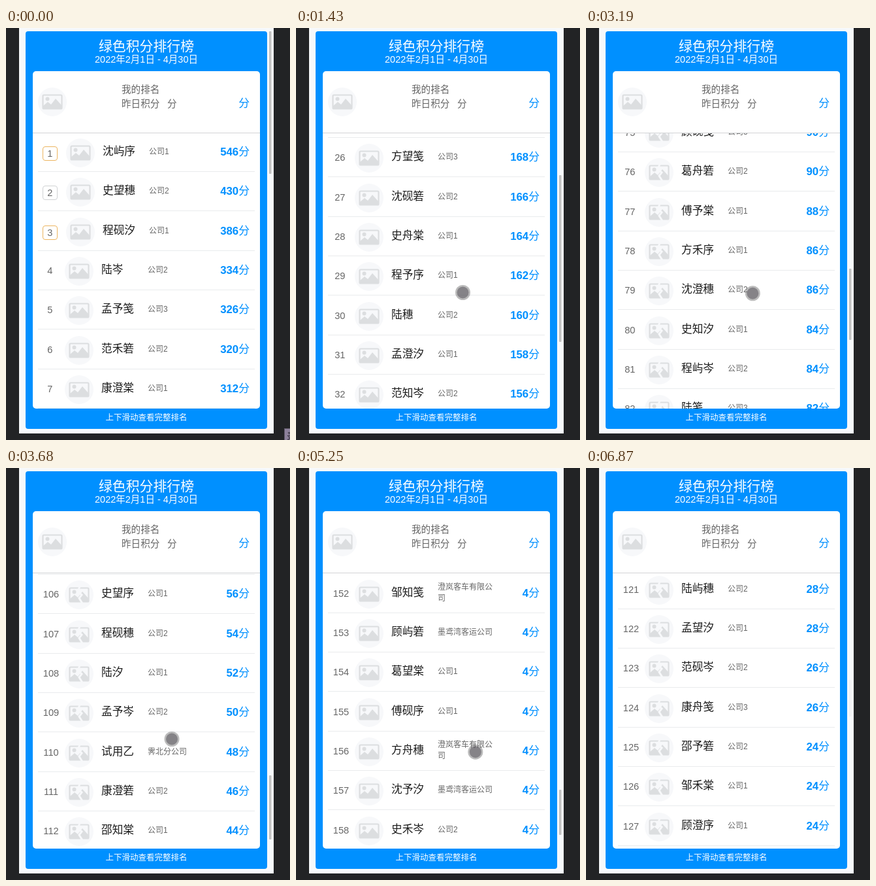
An HTML page for the animation above (7140 ms loop, 435 by 630 pixels).

```html
<!DOCTYPE html>
<html lang="zh-CN">
<head>
<meta charset="utf-8">
<style>
html, body { margin: 0; width: 100%; height: 100%; overflow: hidden; background: #222325; }
svg { display: block; font-family: "Liberation Sans", "Noto Sans CJK SC", "Noto Sans CJK", sans-serif; }
.name { font-size: 16.7px; fill: #1c1c1c; }
.rank { font-size: 14.6px; fill: #666; text-anchor: middle; }
.firm { font-size: 12px; fill: #666; }
.score { font-size: 16.8px; fill: #0090ff; text-anchor: end; }
.score tspan { font-weight: bold; }
.mine { font-size: 14.6px; fill: #666; }
.head { fill: #fff; text-anchor: middle; }
</style>
</head>
<body>
<svg width="435" height="630" viewBox="0 0 435 630">
  <defs>
    <clipPath id="view"><rect x="41" y="161" width="348" height="421"/></clipPath>
    <g id="photo">
      <circle r="22" fill="#f7f8fa"/>
      <rect x="-14.5" y="-10.5" width="29" height="21" rx="1.5" fill="none" stroke="#dcdee0" stroke-width="2.2"/>
      <circle cx="-7.5" cy="-4.5" r="3" fill="#dcdee0"/>
      <path d="M-14 10V6L-7 0L-2 4L5 -5L14 5V10Z" fill="#dcdee0"/>
    </g>
    <path id="crack" d="M1 -13L-2 -5L4 0L0 5L5 13" fill="none" stroke="#f7f8fa" stroke-width="3"/>
  </defs>
  <rect width="435" height="630" fill="#222325"/>
  <rect x="20" width="390" height="620" fill="#f7f9fb"/>
  <rect x="30" y="5" width="370" height="608" rx="4" fill="#0090ff"/>
  <text class="head" x="215" y="35" font-size="20.9">绿色积分排行榜</text>
  <text class="head" x="215" y="53" font-size="14.5">2022年2月1日 - 4月30日</text>
  <rect x="41" y="66" width="348" height="516" rx="5" fill="#fff"/>
  <use href="#photo" x="71" y="113"/>
  <text class="mine" x="177" y="98.5">我的排名</text>
  <text class="mine" x="177" y="120.5">昨日积分</text>
  <text class="mine" x="247" y="120.5">分</text>
  <text class="score" x="373" y="120.5">分</text>
  <rect x="41" y="160" width="348" height="1" fill="#d2d4d6"/>
  <g id="rows" clip-path="url(#view)"></g>
  <text class="head" x="215" y="600" font-size="12.5">上下滑动查看完整排名</text>
  <rect id="thumb" x="403" width="3.5" rx="1" fill="#c2c2c2"/>
  <g id="badge">
    <rect x="426.5" y="612.5" width="14" height="24" fill="#8d819b" stroke="#5a5363"/>
    <text x="430" y="629" font-size="14" fill="#25222a">录</text>
  </g>
  <g id="cursor">
    <circle r="11.5" fill="#777" fill-opacity=".5"/>
    <circle r="9" fill="#3c3840" fill-opacity=".42"/>
  </g>
</svg>
<script>
const LOOP = 7140, STEP = 68, PITCH = 60.33, TOP = 159.2, VIEW = 421, COUNT = 180;
const $ = id => document.getElementById(id);
const pick = (s, n) => s[n % s.length];

const isTrial = r => r > 100 && r % 41 === 28;
const isShort = r => r % 26 === 4 || (r > 130 && (r % 13 === 4 || r % 13 === 5));

function nameOf(r) {
  if (isTrial(r)) return '试用' + pick('乙甲', r);
  const mid = isShort(r) ? '' : pick('知砚禾屿舟澄望予', r * 3);
  return pick('方邵程葛范沈邹陆傅康史顾孟', r * 5) + mid + pick('棠岑序笺穗箬汐', r * 2);
}

// smaller firms turn up only near the end of the list
function firmOf(r) {
  if (isTrial(r)) return [r < 145 ? '霁北分公司' : '墨鸢湾分公司'];
  if (r > 136 && r % 13 === 7) return ['澄岚市轻骑运输', '有限公司'];
  if (r > 144 && r % 4 === 0) return ['澄岚客车有限公', '司'];
  if (r > 144 && r % 4 === 1) return ['墨鸢湾客运公司'];
  return ['公司' + pick('1212321', r - 1)];
}

// falling score curve through a few ranks, rounded to even points
const curve = [[1, 546], [2, 430], [3, 386], [4, 334], [7, 312], [26, 167], [59, 108], [106, 56], [121, 28], [151, 5], [COUNT, 0]];
function scoreOf(r) {
  const i = Math.max(1, curve.findIndex(([rank]) => rank >= r));
  const [r0, v0] = curve[i - 1], [r1, v1] = curve[i];
  return 2 * Math.round((v0 + (v1 - v0) * (r - r0) / (r1 - r0)) / 2);
}

function rowMarkup(r) {
  const top = r < 4, dx = top ? 2 : 0, firm = firmOf(r);
  const box = top ? `<rect x="56.5" y="-37.5" width="22" height="21" rx="3.5" fill="none" stroke="${r === 2 ? '#d0d2d4' : '#ecb560'}"/>` : '';
  const lines = firm.map((s, i) =>
    `<text class="firm" x="${217 + dx}" y="${firm.length > 1 ? -35 + 17 * i : -26}">${s}</text>`).join('');
  return `<g>${box}
    <text class="rank" x="${r > 99 ? 69 : 67.3}" y="${top ? -22.5 : -24}">${r}</text>
    <use href="#photo" x="${112 + dx}" y="-28"/>
    <use class="crack" href="#crack" x="112" y="-28"/>
    <text class="name" x="${146 + dx}" y="-25">${nameOf(r)}</text>${lines}
    <text class="score" x="373" y="-24"><tspan>${scoreOf(r)}</tspan>分</text>
    <rect x="49" width="332" height="1" fill="#e9ebed"/></g>`;
}

$('rows').innerHTML = Array.from({ length: COUNT }, (_, i) => rowMarkup(i + 1)).join('');
const rows = [...$('rows').children];
const cracks = rows.map(g => g.querySelector('.crack'));

// each move: begin, end, two values reached at the end; values rest in between
function follow(from, moves, t) {
  let now = from;
  for (const [begin, end, ...to] of moves) {
    const p = Math.min(1, Math.max(0, (t - begin) / (end - begin)));
    now = now.map((v, i) => v + (to[i] - v) * p);
  }
  return now;
}

// scroll offset and list length used for the scrollbar
const flings = [
  [816, 1020, 24, 55], [1156, 1428, 1500, 47], [1496, 2108, 2960, 94], [2380, 2924, 4232, 108],
  [3128, 3944, 7381, 130], [3944, 4372, 7985, 169], [4760, 5508, 9750, 178], [5508, 6324, 7244, 216]
];
const pointer = [
  [68, 272, 117, 191], [272, 476, 255.5, 404.5], [3128, 3672, 254, 414.5],
  [5100, 5508, 316.5, 473.5], [6528, 6800, 414, 627]
];

function show(el, on) { el.setAttribute('display', on ? 'inline' : 'none'); }

function draw(t) {
  const [offset, loaded] = follow([0, 55], flings, t);
  const failed = t < 2924 ? 0 : t < 5508 ? 120 : 150;
  rows.forEach((g, i) => {
    const y = Math.floor(TOP + PITCH * (i + 1) - offset);
    const on = y > 160 && y < 645;
    show(g, on);
    if (!on) return;
    g.setAttribute('transform', `translate(0 ${y})`);
    show(cracks[i], i < failed);
  });

  const size = 12000 / loaded;
  const top = 5 + offset / (loaded * PITCH - VIEW) * (610 - size);
  $('thumb').setAttribute('y', Math.round(top));
  $('thumb').setAttribute('height', Math.round(size));
  $('thumb').setAttribute('opacity', Math.min(1, Math.max(0.12, (6868 - t) / 340)));

  const [x, y] = follow([424, 622], pointer, t);
  $('cursor').setAttribute('transform', `translate(${x} ${y})`);
  show($('cursor'), t >= STEP && t < 6868);
  show($('badge'), t < STEP);
}

const start = performance.now();
let last = -1;
function tick() {
  const t = (performance.now() - start) % LOOP;
  const s = Math.floor((t + 10) / STEP) * STEP;
  if (s !== last) draw(last = s);
  requestAnimationFrame(tick);
}
tick();
</script>
</body>
</html>
```
